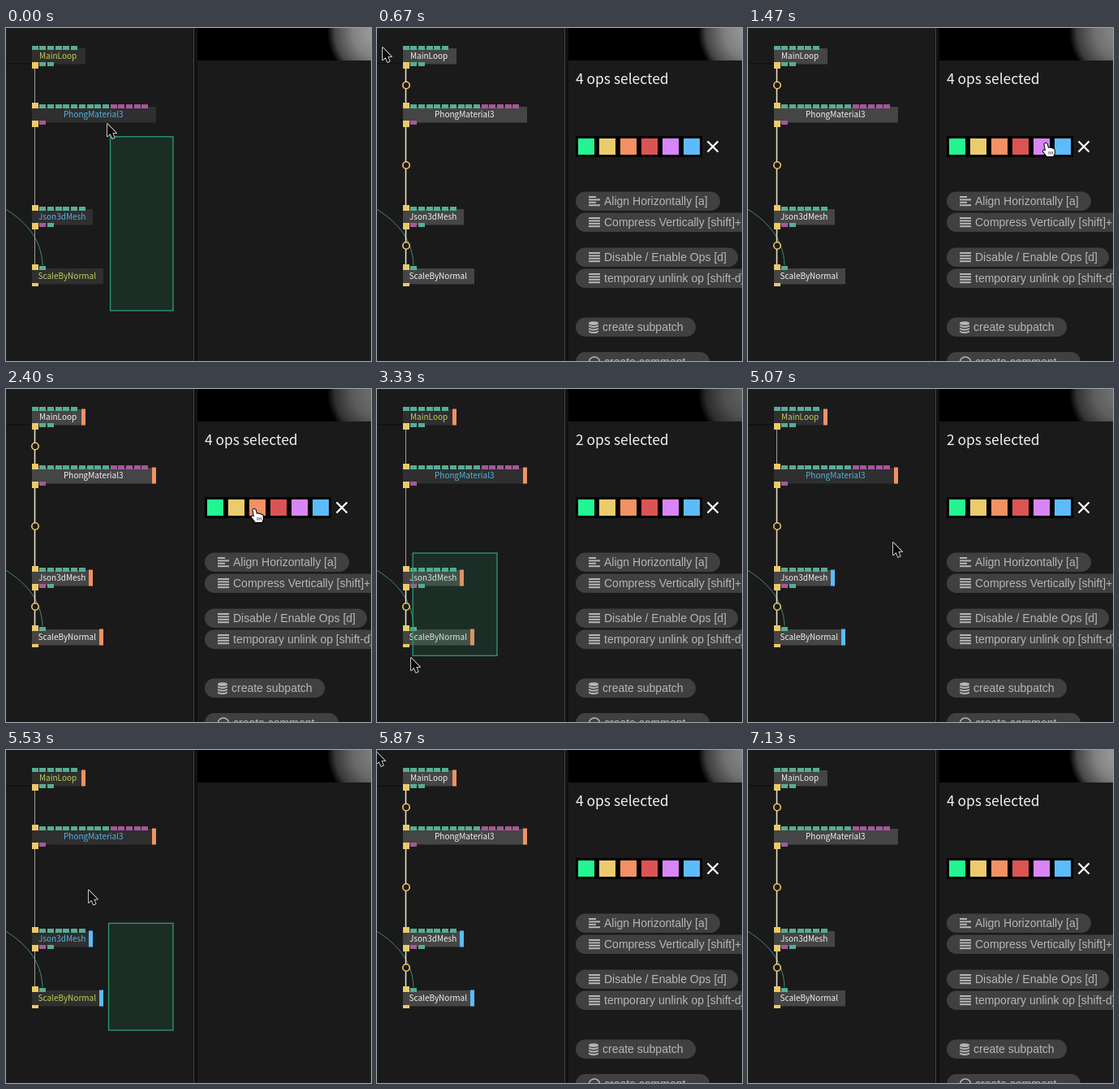
An HTML page with a canvas for the animation above (7340 ms loop, 450x410 px).

```html
<!DOCTYPE html>
<html lang="en">
<head>
<meta charset="utf-8">
<title>Colouring selected ops</title>
<style>
  html, body { margin: 0; width: 100%; height: 100%; overflow: hidden; background: #1a1a1a; }
  canvas { display: block; width: 450px; height: 410px; }
</style>
</head>
<body>
<canvas id="stage" width="450" height="410"></canvas>
<script>
const ctx = document.getElementById('stage').getContext('2d');
const LOOP = 7340;
const UI_FONT = '"Noto Sans CJK JP", "Noto Sans CJK SC", "Noto Sans CJK", "Noto Sans", sans-serif';
const BUTTON_FONT = '14px "Liberation Sans", Arial, sans-serif';
const TEAL = '#55ad95', PURPLE = '#a6579a', YELLOW = '#edca68';
const GREEN_TEXT = '#c0ce5c', BLUE_TEXT = '#50b4e6';
const SWATCHES = ['#22f591', '#ebcc6c', '#f29163', '#db5454', '#d885f8', '#5cbcfb'];
const ORANGE = SWATCHES[2], BLUE = SWATCHES[5];

// Ports: y = yellow, t = teal, p = purple
const nodes = [
  { name: 'MainLoop', y: 25, right: 98, textX: 41, color: GREEN_TEXT, top: 'tttttt', bottom: 'ytt' },
  { name: 'PhongMaterial3', y: 97, right: 185, textX: 71, color: BLUE_TEXT, top: 'ytttttttttppppp', bottom: 'yp' },
  { name: 'Json3dMesh', y: 223, right: 107, textX: 40, color: BLUE_TEXT, top: 'ytttttt', bottom: 'ypt' },
  { name: 'ScaleByNormal', y: 296, right: 120, textX: 39.5, color: GREEN_TEXT, top: 'yt', bottom: 'y' }
];

const drags = [
  { start: -200, end: 600, x: 206, y: 348 },
  { start: 2870, end: 3450, x: 148, y: 202 },
  { start: 5280, end: 5800, x: 206, y: 345 }
];

// Pointer path: time, x, y
const path = [
  [-60, 130, 140], [0, 125, 118], [300, 40, 45], [550, 6, 24], [800, 8, 24],
  [1330, 367, 142], [1470, 367, 142], [1800, 342, 146], [2130, 306, 148], [2400, 306, 148],
  [2530, 153, 183], [2660, 153, 183], [2730, 152, 179], [2800, 152, 179], [2870, 148, 202],
  [3330, 42, 331], [3480, 42, 331], [4050, 388, 146], [4450, 388, 146], [5070, 179, 189],
  [5280, 206, 345], [5780, -1, 2], [5870, -1, 2], [6000, 34, 12], [6700, 413, 146],
  [7000, 413, 146], [7110, 475, 240], [LOOP, 475, 240]
];

function pointerAt(t) {
  let i = 1;
  while (i < path.length - 1 && path[i][0] < t) i++;
  const [t0, x0, y0] = path[i - 1], [t1, x1, y1] = path[i];
  const p = Math.max(0, Math.min(1, (t - t0) / (t1 - t0)));
  const s = p * p * (3 - 2 * p);
  return { x: x0 + (x1 - x0) * s, y: y0 + (y1 - y0) * s };
}

function box(x, y, w, h, color) {
  ctx.fillStyle = color;
  ctx.fillRect(x, y, w, h);
}

function label(text, x, y, font, color) {
  ctx.font = font;
  ctx.fillStyle = color;
  ctx.fillText(text, x, y);
}

function strokePath(d, color, width) {
  ctx.strokeStyle = color;
  ctx.lineWidth = width;
  ctx.stroke(new Path2D(d));
}

function selectionAt(t) {
  const drag = drags.filter(d => d.start <= t).pop();
  const corner = pointerAt(Math.max(drag.start, Math.min(t, drag.end) - 40));
  const rect = {
    left: Math.min(drag.x, corner.x), right: Math.max(drag.x, corner.x),
    top: Math.min(drag.y, corner.y), bottom: Math.max(drag.y, corner.y)
  };
  const picked = nodes.map(n =>
    rect.left < n.right && rect.right > 32 && rect.top < n.y + 19 && rect.bottom > n.y);
  return { rect, picked, dragging: t < drag.end };
}

function barColor(i, t) {
  if (t < 2270 || t >= 7000) return null;
  return t >= 4250 && i > 1 ? BLUE : ORANGE;
}

function drawPorts(ports, y, isTop) {
  [...ports].forEach((kind, i) => {
    const x = Math.round(31.6 + i * 9.7);
    if (kind === 'y') box(x, isTop ? y - 5 : y + 17, 8, isTop ? 7 : 8, YELLOW);
    else box(x, isTop ? y - 3 : y + 17, 8, 5, kind === 't' ? TEAL : PURPLE);
  });
}

function drawNode(node, picked, bar) {
  box(32, node.y, node.right - 32, 19.5, picked ? '#454545' : '#2f2f2f');
  if (bar) box(node.right - 5, node.y - 0.5, 5, 20, bar);
  drawPorts(node.top, node.y, true);
  if (node.name === 'ScaleByNormal') box(32, 314, 8, 4, YELLOW);
  else drawPorts(node.bottom, node.y, false);
  label(node.name, node.textX, node.y + 13, '10px ' + UI_FONT, picked ? '#f0f0f0' : node.color);
}

function drawGraph(t, { picked, dragging }) {
  strokePath('M0 44H32', '#111', 1.5);
  strokePath('M-4 221C22 236 44 258 45 292', '#478873', 1);
  for (let i = 0; i < 3; i++) {
    const active = picked[i + 1] && (!dragging || picked[i]);
    const from = nodes[i].y + 24, to = nodes[i + 1].y - 4;
    strokePath(`M35.5 ${from}V${to}`, active ? '#e6dfc6' : '#a09d94', active ? 1.6 : 1);
    if (!active) continue;
    ctx.beginPath();
    ctx.arc(36, [70.5, 169, 268][i], 4.2, 0, Math.PI * 2);
    ctx.fillStyle = '#1a1a1a';
    ctx.fill();
    ctx.strokeStyle = YELLOW;
    ctx.lineWidth = 1.6;
    ctx.stroke();
  }
  nodes.forEach((node, i) => drawNode(node, picked[i], barColor(i, t)));
}

function drawPreview(t) {
  box(236, 0, 214, 40, '#000');
  const level = 0.8 + 0.2 * Math.cos(t / LOOP * Math.PI * 2);
  const gray = v => `rgb(${Array(3).fill(Math.round(v * level))})`;
  const glow = ctx.createRadialGradient(460, 5, 0, 460, 5, 64);
  glow.addColorStop(0, gray(165));
  glow.addColorStop(0.5, gray(130));
  glow.addColorStop(0.85, gray(70));
  glow.addColorStop(1, '#000');
  ctx.fillStyle = glow;
  ctx.fillRect(390, 0, 60, 40);
}

function pill(text, y, w, textX) {
  ctx.beginPath();
  ctx.roundRect(245, y, w, 23.5, 11.75);
  ctx.fillStyle = '#404040';
  ctx.fill();
  label(text, textX, y + 16.5, BUTTON_FONT, '#b6b6b6');
}

function lines(y, widths) {
  widths.forEach((w, i) => box(261, y + i * 3.4, w, 2, '#b6b6b6'));
}

function drawPanel(count) {
  label(count + ' ops selected', 245, 69, '17.4px ' + UI_FONT, '#f2f2f2');
  box(245, 133, 156, 26, '#000');
  SWATCHES.forEach((color, i) => box(248 + i * 26, 136, 20, 20, color));
  strokePath('M407.5 139.5L420.5 152.5M420.5 139.5L407.5 152.5', '#fff', 2.3);

  pill('Align Horizontally [a]', 201.5, 178, 280);
  pill('Compress Vertically [shift]+[c]', 227.5, 240, 280);
  pill('Disable / Enable Ops [d]', 270.5, 200, 280);
  pill('temporary unlink op [shift-d]', 296.5, 230, 280);
  pill('create subpatch', 356.5, 148, 278);
  pill('create comment', 399, 165, 280);
  lines(207, [9, 14, 9, 14]);
  [233, 276, 302].forEach(y => lines(y, [14, 14, 14, 14]));

  ctx.fillStyle = '#b6b6b6';
  ctx.beginPath();
  ctx.ellipse(267, 363.5, 6, 2.3, 0, 0, Math.PI * 2);
  ctx.fill();
  for (const y of [365.5, 369, 372.5]) {
    ctx.fill(new Path2D(`M261 ${y}Q267 ${y + 3} 273 ${y}V${y + 2}Q267 ${y + 5} 261 ${y + 2}Z`));
  }
  strokePath('M261.5 411a6.5 6 0 0 1 13 0', '#b6b6b6', 1.6);
}

const ARROW = new Path2D('M0 0V15.5L3.6 12.3L6 18L8.8 16.8L6.4 11.3H11Z');
const HAND = new Path2D('M-1.5 1Q0 -1.5 1.8 1L3 6Q4.5 4.6 5.7 6.2Q7.3 5 8.4 6.8Q10.8 6 10.8 9' +
  'V12Q10.5 14 9.2 16H1.5Q0 13.5 -2.6 10.8Q-3.8 8.8 -1.8 8.2L0 9.4Z');

function drawPointer({ x, y }, panelOpen) {
  const overColors = y > 133 && y < 159 && x > 245 && x < 423;
  const overButtons = x > 245 && (y > 202 && y < 251 || y > 270 && y < 320);
  const hand = panelOpen && (overColors || overButtons);
  const shape = hand ? HAND : ARROW;
  ctx.save();
  ctx.translate(x, y);
  ctx.lineJoin = 'round';
  ctx.strokeStyle = hand ? '#000' : '#fff';
  ctx.lineWidth = hand ? 2 : 1.5;
  ctx.fillStyle = hand ? '#fff' : '#0a0a0a';
  ctx.stroke(shape);
  ctx.fill(shape);
  if (hand) strokePath('M4 10V13.5M6.2 10V13.5M8.4 10V13.5', '#222', 0.8);
  ctx.restore();
}

function draw(t) {
  const selection = selectionAt(t);
  const count = selection.picked.filter(Boolean).length;
  box(0, 0, 450, 410, '#1a1a1a');
  drawGraph(t, selection);
  box(231, 0, 1, 410, '#424242');
  box(232, 0, 4, 410, '#111');
  drawPreview(t);
  if (count > 1) drawPanel(count);
  if (selection.dragging) {
    const { left, top, right, bottom } = selection.rect;
    box(left, top, right - left, bottom - top, 'rgba(40, 170, 115, 0.13)');
    ctx.strokeStyle = '#2a9d70';
    ctx.lineWidth = 1.3;
    ctx.strokeRect(left, top, right - left, bottom - top);
  }
  drawPointer(pointerAt(t), count > 1);
}

const begin = performance.now();
function tick() {
  draw((performance.now() - begin) % LOOP);
  requestAnimationFrame(tick);
}
tick();
</script>
</body>
</html>
```
